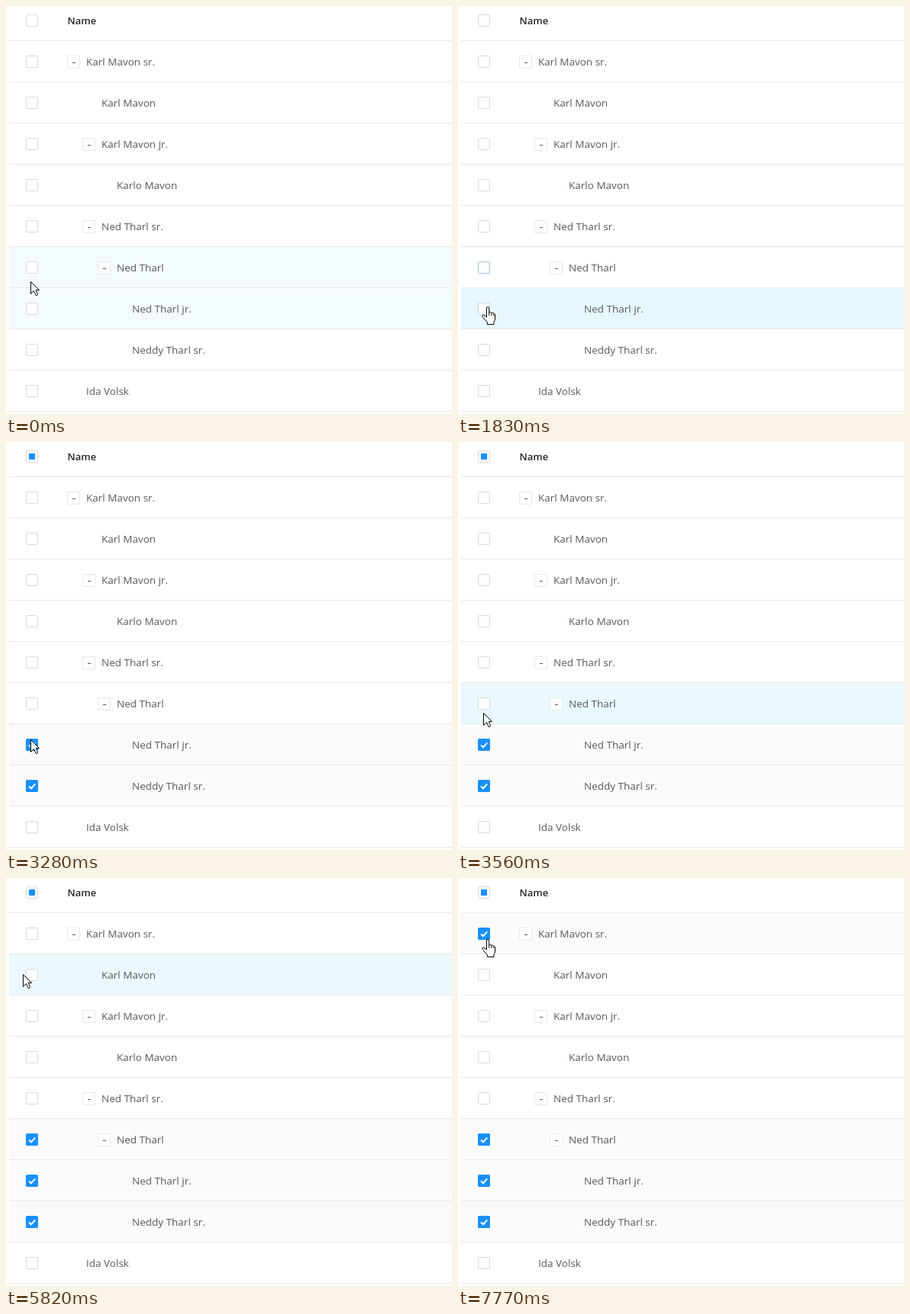
Recreate the animation shown at these times as an HTML page with a canvas. Size 584 by 535 pixels, loop 8 s.

```html
<!DOCTYPE html>
<html lang="en">
<head>
<meta charset="utf-8">
<title>Tree table selection</title>
<style>
  html, body { margin: 0; width: 100%; height: 100%; overflow: hidden; background: #fff; }
  canvas { position: absolute; left: 0; top: 0; }
  span {
    position: absolute; white-space: nowrap; color: #595959;
    font: 13.5px/20px "Open Sans", "Noto Sans", sans-serif;
  }
  .head { color: #262626; font-weight: 600; font-size: 13px; }
</style>
</head>
<body>
<canvas id="stage" width="584" height="535"></canvas>
<script>
const ctx = document.getElementById('stage').getContext('2d');
const LOOP = 8000;
const WHITE = [255, 255, 255], HOVER = [230, 247, 255], PICKED = [250, 250, 250];
const GREY = [217, 217, 217], BLUE = [24, 144, 255];
const OFF = [0], ON = [1];

// label, text x, has an expand icon, then [time, value] keys
const rows = [
  { label: 'Karl Mavon sr.', x: 105, icon: true,
    back: [[6000, HOVER], [7380, PICKED]], edge: [[6800, BLUE]], check: [[7300, ON]] },
  { label: 'Karl Mavon', x: 125, back: [[5580, HOVER], [6000, WHITE]] },
  { label: 'Karl Mavon jr.', x: 125, icon: true },
  { label: 'Karlo Mavon', x: 145 },
  { label: 'Ned Tharl sr.', x: 125, icon: true },
  { label: 'Ned Tharl', x: 145, icon: true,
    back: [[-150, HOVER], [710, PICKED], [1290, HOVER], [1540, WHITE], [3300, HOVER], [3980, PICKED]],
    edge: [[250, BLUE], [1620, GREY], [3650, BLUE]],
    check: [[640, ON], [1220, OFF], [3900, ON]] },
  { label: 'Ned Tharl jr.', x: 165, start: HOVER,
    back: [[-150, WHITE], [1540, HOVER], [2200, PICKED]], edge: [[1800, BLUE]], check: [[2140, ON]] },
  { label: 'Neddy Tharl sr.', x: 165,
    back: [[2260, HOVER], [2770, PICKED]], edge: [[2580, BLUE]], check: [[2690, ON]] },
  { label: 'Ida Volsk', x: 105 }
];

// time, shape, x, y
const moves = [
  [0, 'arrow', 32, 361], [160, 'hand', 29, 350], [310, 'hand', 30, 350], [1410, 'hand', 30, 349],
  [1560, 'arrow', 36, 380], [1680, 'hand', 31, 391], [1830, 'hand', 31, 394],
  [2350, 'arrow', 36, 424], [2500, 'arrow', 34, 434], [2620, 'hand', 26, 442],
  [3160, 'arrow', 32, 426], [3280, 'arrow', 32, 390], [3400, 'arrow', 32, 365],
  [3560, 'arrow', 33, 355], [3710, 'hand', 28, 346], [5340, 'hand', 28, 342],
  [5460, 'arrow', 30, 300], [5580, 'arrow', 26, 240], [5700, 'arrow', 23, 176],
  [5820, 'arrow', 22, 126], [5940, 'arrow', 30, 108], [6060, 'arrow', 36, 96],
  [6180, 'arrow', 35, 88], [6300, 'arrow', 33, 83], [6860, 'hand', 31, 81], [6980, 'hand', 31, 80]
];

// moments at which the screen refreshes
const ticks = [
  0, 160, 310, 460, 580, 710, 830, 980, 1130, 1290, 1410, 1560, 1680, 1830, 1950, 2070, 2220, 2350,
  2500, 2620, 2770, 2890, 3010, 3160, 3280, 3400, 3560, 3710, 3830, 3980, 4100, 4250, 4400, 5340,
  5460, 5580, 5700, 5820, 5940, 6060, 6180, 6300, 6430, 6860, 6980, 7130, 7380, 7530, 7650, 7770
];

const cursors = {
  arrow: new Path2D('M.5 .5V16.5L4.5 12.5L7.2 18.5H8.6L9.5 16.8L7.3 11.5H11.5Z'),
  hand: new Path2D('M6.5 14V2.2q0-1.7 1.6-1.7t1.6 1.7V8.5q.3-1 1.6-1t1.6 1.3q.3-.7 1.5-.6t1.4 1.4' +
    'q.3-.5 .9-.3t.8 1.3V16q0 2.5-1.5 4.2V23.5H7.5V21L2 14.6Q.2 12.4 1.2 11.4T4 12Z')
};
const knuckles = new Path2D('M9.7 8.5V12M12.9 9V12M15.8 10V12');

const rowTop = i => 46 + 54 * i;
const rgb = c => `rgb(${c.map(Math.round)})`;

function blend(start, keys = [], t, span) {
  return keys.reduce((now, [at, next]) => {
    const p = Math.max(0, Math.min(1, (t - at) / span));
    return now.map((v, i) => v + (next[i] - v) * p);
  }, start);
}

function addText(text, x, y, cls = '') {
  const el = document.createElement('span');
  el.textContent = text;
  el.className = cls;
  el.style.left = x + 'px';
  el.style.top = y + 'px';
  document.body.append(el);
}

function box(x, y, size, radius, fill, stroke) {
  ctx.beginPath();
  ctx.roundRect(x + .5, y + .5, size - 1, size - 1, radius);
  ctx.fillStyle = fill;
  ctx.fill();
  ctx.strokeStyle = stroke;
  ctx.lineWidth = 1;
  ctx.stroke();
}

function drawWave(y, age) {
  const p = age / 280, grow = 4.8 * p;
  if (p < 0 || p >= 1) return;
  ctx.globalAlpha = .5 * (1 - p);
  ctx.strokeStyle = rgb(BLUE);
  ctx.beginPath();
  ctx.roundRect(26.5 - grow, y + .5 - grow, 15 + 2 * grow, 15 + 2 * grow, 2);
  ctx.stroke();
  ctx.globalAlpha = 1;
}

function drawRow(row, i, t) {
  const top = rowTop(i), y = top + 19;
  ctx.fillStyle = rgb(blend(row.start || WHITE, row.back, t, 300));
  ctx.fillRect(4, top, 580, 53);

  box(26, y, 16, 1.5, '#fff', rgb(blend(GREY, row.edge, t, 300)));
  const [on] = blend(OFF, row.check, t, 200);
  if (on > 0) {
    ctx.globalAlpha = on;
    box(26, y, 16, 1.5, rgb(BLUE), rgb(BLUE));
    ctx.strokeStyle = '#fff';
    ctx.lineWidth = 2;
    ctx.beginPath();
    ctx.moveTo(30, y + 8.4);
    ctx.lineTo(32.9, y + 11.3);
    ctx.lineTo(38.2, y + 5.3);
    ctx.stroke();
    ctx.globalAlpha = 1;
    ctx.lineWidth = 1;
  }
  for (const [at, value] of row.check || []) if (value === ON) drawWave(y, t - at - 75);

  if (row.icon) {
    box(row.x - 25, y, 17, 0, '#fff', '#e8e8e8');
    ctx.fillStyle = '#595959';
    ctx.fillRect(row.x - 18, y + 9, 4, 1);
  }
}

function drawCursor(t) {
  const [, shape, x, y] = moves.findLast(m => m[0] <= t);
  ctx.save();
  ctx.translate(x, y);
  ctx.fillStyle = '#fff';
  ctx.strokeStyle = '#000';
  ctx.lineWidth = 1;
  ctx.fill(cursors[shape]);
  ctx.stroke(cursors[shape]);
  if (shape === 'hand') ctx.stroke(knuckles);
  ctx.restore();
}

function draw(t) {
  ctx.fillStyle = '#fff';
  ctx.fillRect(0, 0, 584, 535);
  box(26, 11, 16, 1.5, '#fff', rgb(GREY));
  if ((t >= 710 && t < 1290) || t >= 2220) {
    ctx.fillStyle = rgb(BLUE);
    ctx.fillRect(30, 15, 8, 8);
  }
  rows.forEach((row, i) => drawRow(row, i, t));
  ctx.fillStyle = '#e8e8e8';
  for (let i = 0; i <= rows.length; i++) ctx.fillRect(4, rowTop(i) - 1, 580, 1);
  drawCursor(t);
}

addText('Name', 80.5, 9, 'head');
rows.forEach((row, i) => addText(row.label, row.x, rowTop(i) + 17));

const begin = performance.now();
function loop() {
  const t = (performance.now() - begin) % LOOP;
  draw(ticks.findLast(tick => tick <= t));
  requestAnimationFrame(loop);
}
loop();
</script>
</body>
</html>
```
